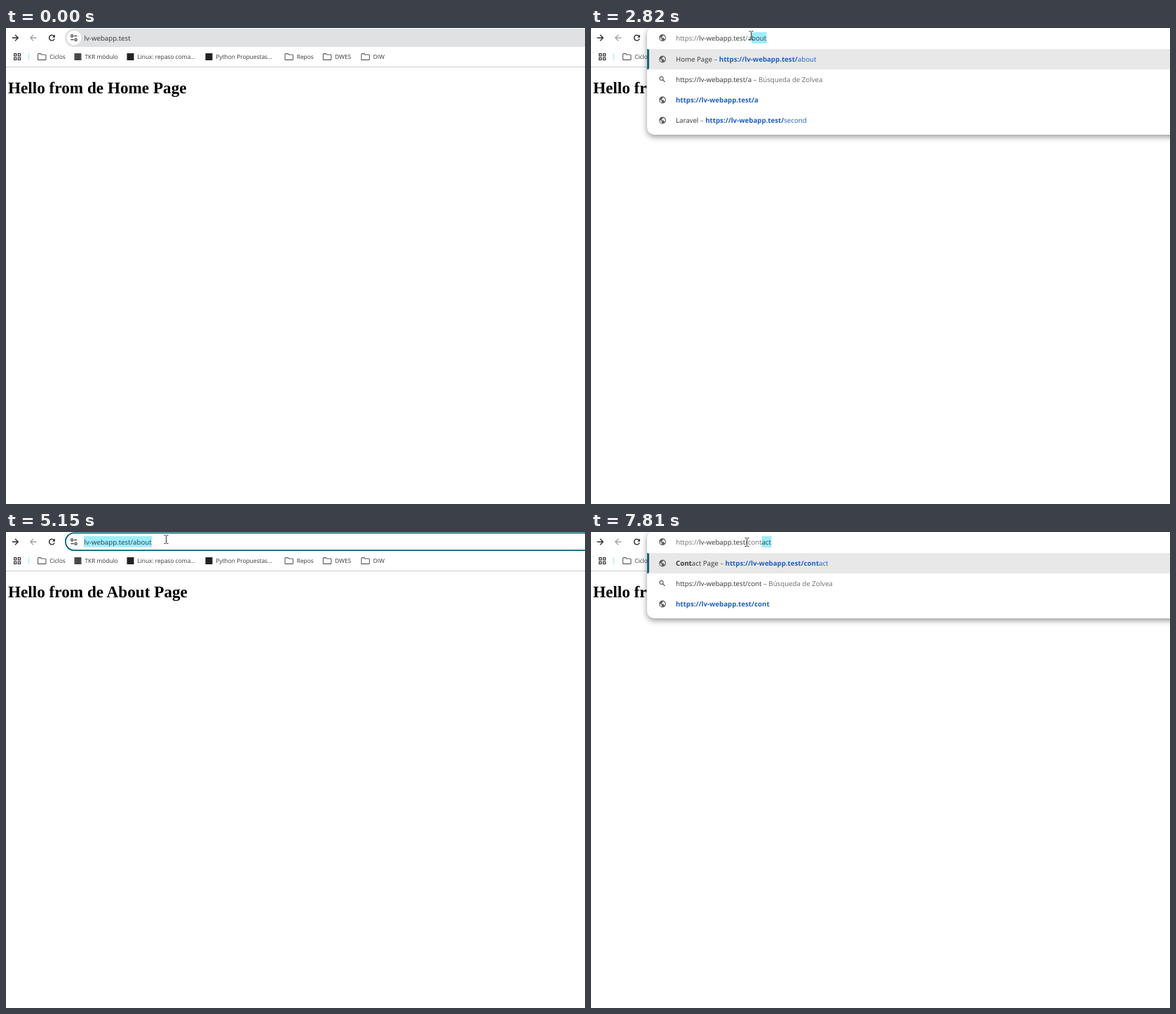
An HTML page with a canvas that plays this animation: 826x678 px, repeating every 7990 ms.

```html
<!DOCTYPE html>
<html lang="es">
<head>
<meta charset="utf-8">
<title>Home Page</title>
<style>
  html, body { margin: 0; width: 100%; height: 100%; overflow: hidden; background: #fff; }
  canvas { display: block; }
</style>
</head>
<body>
<canvas id="stage" width="826" height="678"></canvas>
<script>
const ctx = document.getElementById('stage').getContext('2d');
const W = 826, H = 678, LOOP = 7990, TAU = Math.PI * 2;
const SANS = '"Open Sans", "Noto Sans", sans-serif';
const UI = '9.7px ' + SANS, BOLD = 'bold 9.7px ' + SANS, SMALL = '8.4px ' + SANS;
const SERIF = 'bold 23.2px "Liberation Serif", "Times New Roman", serif';
const INK = '#333436', DIM = '#6c6d70', BLUE = '#1f5fc0', TEAL = '#00637a', PICK = '#9deefc';
const HOST = 'lv-webapp.test', SITE = 'https://' + HOST + '/';

// ---------- suggestion rows ----------
const page = (title, hit, rest = '', strong = '') => ({ title, strong, hit, rest });
const raw = path => ({ title: '', strong: '', hit: path, rest: '' });
const find = path => ({ query: SITE + path });
const about = (hit, rest) => page('Home Page', hit, rest);
const second = page('Laravel', '', 'second');
const rootRows = [raw(''), about('', 'about'), page('Contact Page', '', 'contact'), second, find('')];

// ---------- timeline ----------
const bar = (path, opts) => ({ mode: 'bar', path, ...opts });
const edit = (path, caret) => ({ mode: 'edit', path, caret });
const list = (typed, rest, rows) => ({ mode: 'list', typed, rest, rows });
const timeline = [
  [0, bar('')],
  [840, bar('', { hover: true })],
  [1000, { mode: 'picked', path: '' }],
  [1490, edit('', true)],
  [1980, edit('', false)],
  [2480, list('', '', rootRows)],
  [2820, list('a', 'bout', [about('', 'about'), find('a'), raw('a'), second])],
  [2990, list('ab', 'out', [about('ab', 'out'), find('ab'), raw('ab')])],
  [3160, list('abo', 'ut', [about('abo', 'ut'), find('abo'), raw('abo')])],
  [3480, list('abou', 't', [about('abou', 't'), find('abou'), raw('abou')])],
  [3650, list('about', '', [about('about'), find('about')])],
  [3980, bar('/about', { hover: true, loading: true })],
  [4150, bar('/about', { hover: true })],
  [5150, { mode: 'picked', path: '/about' }],
  [5480, edit('/about', true)],
  [6150, list('abou', '', [raw('abou'), find('abou')])],
  [6330, list('abou', '', [raw('abou'), about('abou', 't'), find('abou')])],
  [6490, list('abo', '', [raw('abo'), about('abo', 'ut'), find('abo')])],
  [6660, list('ab', '', [raw('ab'), about('ab', 'out'), find('ab')])],
  [6820, list('a', '', [raw('a'), about('a', 'bout'), find('a')])],
  [7150, list('', '', rootRows)],
  [7500, list('c', 'ontact', [page('ontact Page', 'c', 'ontact', 'C'), find('c'), raw('c'), second])],
  [7650, list('con', 'tact', [page('tact Page', 'con', 'tact', 'Con'), find('con'), raw('con')])],
  [7810, list('cont', 'act', [page('act Page', 'cont', 'act', 'Cont'), find('cont'), raw('cont')])]
];

// ---------- drawing helpers ----------
function text(str, x, y, color = INK, font = UI) {
  ctx.font = font;
  ctx.fillStyle = color;
  ctx.fillText(str, x, y);
  return x + ctx.measureText(str).width;
}

function width(str, font = UI) {
  ctx.font = font;
  return ctx.measureText(str).width;
}

function rect(x, y, w, h, color) {
  ctx.fillStyle = color;
  ctx.fillRect(x, y, w, h);
}

function round(x, y, w, h, r, color) {
  ctx.beginPath();
  ctx.roundRect(x, y, w, h, r);
  ctx.fillStyle = color;
  ctx.fill();
}

function line(color, w, ...paths) {
  ctx.strokeStyle = color;
  ctx.lineWidth = w;
  ctx.beginPath();
  for (const p of paths)
    for (let i = 0; i < p.length; i += 2) ctx[i ? 'lineTo' : 'moveTo'](p[i], p[i + 1]);
  ctx.stroke();
}

function ring(x, y, r, color, w) {
  ctx.strokeStyle = color;
  ctx.lineWidth = w;
  ctx.beginPath();
  ctx.arc(x, y, r, 0, TAU);
  ctx.stroke();
}

function shape(color, ...p) {
  ctx.fillStyle = color;
  ctx.beginPath();
  for (let i = 0; i < p.length; i += 2) ctx.lineTo(p[i], p[i + 1]);
  ctx.closePath();
  ctx.fill();
}

// ---------- icons ----------
function arrow(x, dir, color) {
  line(color, 1.3, [x - 4.3 * dir, 14, x + 4.3 * dir, 14], [x, 9.7, x - 4.3 * dir, 14, x, 18.3]);
}

function reload() {
  ctx.strokeStyle = '#2b2c2e';
  ctx.lineWidth = 1.4;
  ctx.beginPath();
  ctx.arc(65.5, 14, 3.9, 0.35, TAU - 0.75);
  ctx.stroke();
  shape('#2b2c2e', 70, 9.4, 70, 13.4, 66, 13.4);
}

function folder(x) {
  ctx.strokeStyle = '#5a5b5e';
  ctx.lineWidth = 1.1;
  ctx.beginPath();
  ctx.moveTo(x + 1.4, 36.6);
  ctx.lineTo(x + 4.6, 36.6);
  ctx.lineTo(x + 6, 38);
  ctx.lineTo(x + 11, 38);
  ctx.quadraticCurveTo(x + 12, 38, x + 12, 39);
  ctx.lineTo(x + 12, 44.4);
  ctx.quadraticCurveTo(x + 12, 45.4, x + 11, 45.4);
  ctx.lineTo(x + 1.4, 45.4);
  ctx.quadraticCurveTo(x + 0.5, 45.4, x + 0.5, 44.4);
  ctx.lineTo(x + 0.5, 37.6);
  ctx.quadraticCurveTo(x + 0.5, 36.6, x + 1.4, 36.6);
  ctx.stroke();
}

function tune() {
  const c = '#3a3b3d';
  ring(94.2, 11.3, 1.6, c, 1.2);
  ring(99.6, 16.7, 1.6, c, 1.2);
  line(c, 1.2, [97.2, 11.3, 101.4, 11.3], [92.4, 16.7, 96.6, 16.7]);
}

function globe(x, y, back) {
  ctx.fillStyle = '#5c5e62';
  ctx.beginPath();
  ctx.arc(x, y, 4.9, 0, TAU);
  ctx.fill();
  shape(back, x - 3.7, y - 0.8, x - 0.9, y + 2, x - 0.9, y + 3.8, x - 2.6, y + 2.9, x - 3.8, y + 1);
  shape(back, x + 0.9, y - 3.7, x + 2.8, y - 2.6, x + 3.8, y - 0.4, x + 3.5, y + 1.9,
    x + 2.3, y + 1.5, x + 1.8, y + 0.1, x - 1.4, y - 0.1, x - 1.4, y - 1.1, x - 0.2, y - 1.3, x + 0.2, y - 2.4);
}

function lens(x, y) {
  ring(x - 1, y - 1.1, 2.5, '#5c5e62', 1.1);
  line('#5c5e62', 1.3, [x + 0.8, y + 0.7, x + 4, y + 3.9]);
}

// ---------- page and toolbar ----------
function chrome(loading) {
  arrow(13, -1, '#2b2c2e');
  arrow(39, 1, '#a3a4a6');
  if (loading) line('#2b2c2e', 1.3, [61.8, 10.3, 69.2, 17.7], [69.2, 10.3, 61.8, 17.7]);
  else reload();

  ctx.strokeStyle = '#333436';
  ctx.lineWidth = 1.2;
  for (const x of [11.6, 17.4]) for (const y of [36.6, 42.2]) ctx.strokeRect(x, y, 3.2, 3.2);
  rect(32, 36, 1, 10, '#a5e6f3');

  for (const [x, label] of [[45, 'Ciclos'], [397.5, 'Repos'], [452, 'DWES'], [506.5, 'DIW']]) {
    folder(x);
    text(label, x + 17.2, 44, INK, SMALL);
  }
  rect(97.5, 36, 10, 10, '#4b4b46');
  text('TKR módulo', 112.4, 44, INK, SMALL);
  rect(172.5, 36, 10, 10, '#232323');
  text('Linux: repaso coma...', 187.3, 44, INK, SMALL);
  rect(284.5, 36, 10, 10, '#232323');
  text('Python Propuestas...', 299.4, 44, INK, SMALL);
  rect(0, 55, W, 1, '#cbccce');
}

function pill(s) {
  if (s.mode === 'bar') {
    round(84, 1, W, 26, 13, s.hover ? '#d5d7d9' : '#dfe1e3');
    ctx.fillStyle = '#fff';
    ctx.beginPath();
    ctx.arc(97, 14, 10.3, 0, TAU);
    ctx.fill();
  } else {
    round(84, 0.5, W, 26.5, 13.2, TEAL);
    round(85.8, 2.3, W, 22.9, 11.4, '#fff');
  }
  tune();
  const x = 111.5;
  if (s.mode === 'edit') {
    const end = address(x, s.path);
    if (s.caret) rect(Math.round(end), 7, 1, 13, '#222');
  } else if (s.mode === 'picked') {
    rect(x - 0.5, 6, width(HOST + s.path) + 1, 15.5, PICK);
    text(HOST + s.path, x, 17.5, '#28424a');
  } else {
    text(s.path, text(HOST, x, 17.5), 17.5, DIM);
  }
}

function address(x, path) {
  const host = text('https://', x, 17.5, DIM);
  return text(path, text(HOST, host, 17.5), 17.5, DIM);
}

// ---------- drop-down ----------
function panel(s) {
  const bottom = 36 + s.rows.length * 29;
  ctx.save();
  ctx.shadowColor = 'rgba(0,0,0,.42)';
  ctx.shadowBlur = 9;
  ctx.shadowOffsetY = 3;
  round(80, -2, W, bottom + 2, 10, '#fff');
  ctx.restore();

  rect(80, 30, W, 29, '#e8e8e8');
  round(80, 30, 3, 29, [0, 2, 2, 0], '#1c6478');
  globe(102, 14, '#fff');
  const end = address(121, '/' + s.typed);
  if (s.rest) {
    rect(end, 6, width(s.rest) + 0.5, 16, PICK);
    text(s.rest, end, 17.5, '#28424a');
  } else {
    rect(Math.round(end), 7, 1, 13, '#222');
  }
  s.rows.forEach((r, i) => row(r, 44.5 + i * 29, i ? '#fff' : '#e8e8e8'));
}

function row(r, y, back) {
  const base = y + 3.5;
  let x = 121;
  if (r.query) {
    lens(101.5, y - 0.5);
    x = text(r.query, x, base);
    text(' – Búsqueda de Zolvea', x, base, DIM);
    return;
  }
  globe(102, y, back);
  if (r.title) {
    x = text(r.strong, x, base, INK, BOLD);
    x = text(r.title, x, base);
    x = text(' – ', x, base, DIM);
  }
  x = text(SITE + r.hit, x, base, BLUE, BOLD);
  text(r.rest, x, base, BLUE);
}

// ---------- pointer ----------
const ticks = (t, from) => Math.floor((t - from) / 165 + 0.02) ;

function pointer(t) {
  if (t < 170) return null;
  if (t < 840) {
    const k = 1 - ticks(t, 170) / 4;
    return [228 + 190 * k * k, 10 + 440 * k * k];
  }
  if (t < 1320) return [228, 10];
  if (t < 1660) return [229, 8];
  if (t < 5480) return [228, 10];
  const k = Math.min(1, ticks(t, 5315) / 3);
  return [228 - 6 * k, 10 + 4 * k];
}

function drawPointer(x, y) {
  if (y < 28) {
    const beam = [[x - 3, y - 6, x - 1, y - 6, x, y - 5, x, y + 5, x - 1, y + 6, x - 3, y + 6],
      [x + 3, y - 6, x + 1, y - 6, x, y - 5], [x, y + 5, x + 1, y + 6, x + 3, y + 6]];
    ctx.save();
    ctx.translate(0.5, 0.5);
    line('#333', 1, ...beam);
    ctx.restore();
    return;
  }
  const p = [0, 0, 0, 13, 3, 10.2, 5, 15, 7, 14.2, 5, 9.6, 9.2, 9.4].map((v, i) => v + (i % 2 ? y : x));
  shape('#fff', ...p);
  line('#111', 0.9, [...p, x, y]);
}

// ---------- loop ----------
function draw(t) {
  const s = timeline.findLast(e => e[0] <= t)[1];
  ctx.textRendering = 'geometricPrecision';
  rect(0, 0, W, H, '#fff');
  chrome(s.loading);
  text(`Hello from de ${t < 4150 ? 'Home' : 'About'} Page`, 3, 93, '#000', SERIF);
  if (s.mode === 'list') panel(s);
  else pill(s);
  const p = pointer(t);
  if (p) drawPointer(...p);
}

const start = performance.now();
function tick() {
  draw((performance.now() - start) % LOOP);
  requestAnimationFrame(tick);
}
tick();
</script>
</body>
</html>
```
